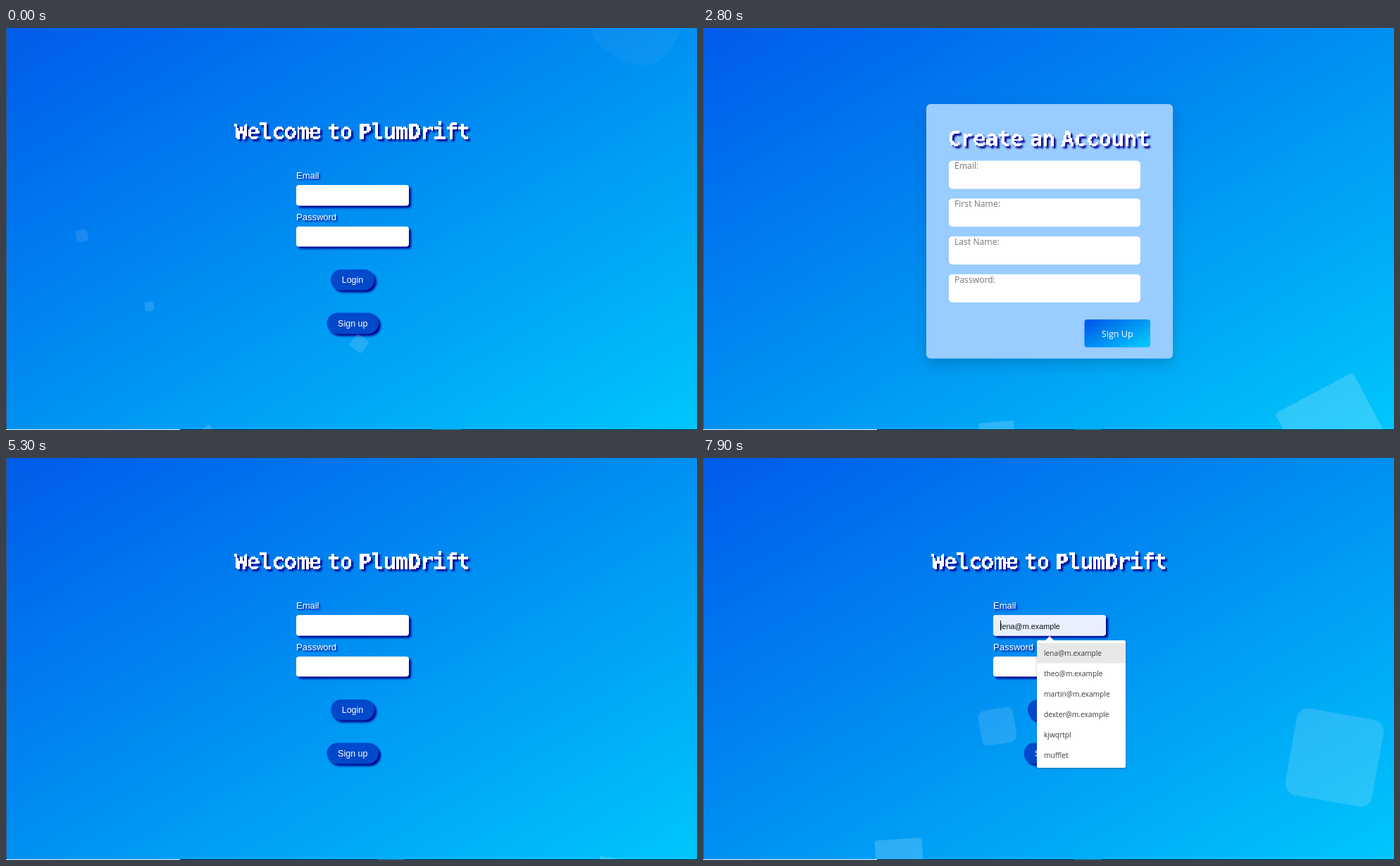
An HTML page for the animation above (8 s loop, 981 px wide and 571 px high).

```html
<!DOCTYPE html>
<html lang="en">
<head>
<meta charset="utf-8">
<title>Welcome</title>
<style>
  /* Seconds into the loop; everything that drifts derives from it. */
  @property --t { syntax: "<number>"; inherits: true; initial-value: 0; }

  html, body { margin: 0; width: 100%; height: 100%; overflow: hidden; }

  #stage {
    position: relative; width: 981px; height: 571px; overflow: hidden;
    background: linear-gradient(150deg, #005bea, #00c6fb);
    animation: clock 8s linear infinite;
  }
  @keyframes clock { from { --t: 0; } to { --t: 8; } }

  svg, .squares { position: absolute; inset: 0; width: 981px; height: 571px; }

  /* Scene cuts */
  .first, .signup, .second, .login, .hover, .menu, .pick {
    animation: 8s step-end infinite;
  }
  .first  { animation-name: first; }
  .signup { animation-name: signup; }
  .second { animation-name: second; }
  .login  { animation-name: login; }
  .hover  { animation-name: hover; }
  .menu   { animation-name: menu; }
  .pick   { animation-name: pick; }
  @keyframes first  { 0% { opacity: 1; } 24%, 100% { opacity: 0; } }
  @keyframes signup { 0% { opacity: 0; } 24% { opacity: 1; } 64.8%, 100% { opacity: 0; } }
  @keyframes second { 0% { opacity: 0; } 64.8%, 100% { opacity: 1; } }
  @keyframes login  { 0% { opacity: 1; } 24% { opacity: 0; } 64.8%, 100% { opacity: 1; } }
  @keyframes hover  { 0% { opacity: 0; } 17.4% { opacity: 1; } 24%, 100% { opacity: 0; } }
  @keyframes menu   { 0% { opacity: 0; } 84.9% { opacity: 1; } 100% { opacity: 1; } }
  @keyframes pick   { 0% { opacity: 0; } 93.6% { opacity: 1; } 100% { opacity: 1; } }

  /* Rising squares: --t0 start, --d seconds for the whole climb */
  .squares i {
    --q: calc((var(--t) - var(--t0)) / var(--d));
    position: absolute; bottom: -136.5px;
    left: calc(1px + var(--x) * 9.8px);
    width: var(--s); height: var(--s);
    background: rgba(255, 255, 255, .2);
    transform: translateY(calc(var(--q) * -833px)) rotate(calc(var(--q) * 720deg));
    opacity: calc(1 - var(--q));
    border-radius: calc(var(--q) * 50%);
  }
  .squares.signup { --t0: 1.915; }
  .squares.second { --t0: 5.185; }
  .a { --x: 25; --s: 66.7px;  --d: 22.7; }
  .b { --x: 10; --s: 16.7px;  --d: 11.25; }
  .c { --x: 40; --s: 50px;    --d: 7.5; }
  .e { --x: 65; --s: 16.7px;  --d: 22.7; }
  .f { --x: 50; --s: 20.8px;  --d: 20.8; }
  .g { --x: 20; --s: 12.5px;  --d: 15.05; }
  .h { --x: 85; --s: 125px;   --d: 10.28; }

  /* Type */
  text { white-space: pre; }
  .title {
    font: bold 31px "DejaVu Sans Mono", monospace;
    letter-spacing: -1.15px; word-spacing: -8.4px;
    fill: #fff; filter: url(#pixel);
  }
  .glow   { filter: drop-shadow(3px 3px 1px #0a0a96); }
  .label  { font: 13px "Liberation Sans", sans-serif; fill: #fff;
            filter: drop-shadow(2px 2px 1px #00008b); }
  .button { font: 12.5px "Liberation Sans", sans-serif; fill: #fff; text-anchor: middle; }
  .typed  { font: 10.9px "Liberation Sans", sans-serif; fill: #111; }
  .hint   { font: 12.2px "Open Sans", sans-serif; fill: #757575; }
  .send   { font: 12.6px "Open Sans", sans-serif; fill: #fff; text-anchor: middle; }
  .item   { font: 10.2px "Open Sans", sans-serif; fill: #3a3a3a; }
  .status { font: 9.3px "Open Sans", sans-serif; fill: #5f6368; }

  .drop { filter: drop-shadow(3px 3px 1.5px #00008b); }
  .card { filter: drop-shadow(0 8px 10px rgba(0, 0, 0, .16)); }
  .list { filter: drop-shadow(0 1px 1.5px rgba(0, 0, 0, .3)); }
</style>
</head>
<body>
<div id="stage">

  <svg viewBox="0 0 981 571">
    <defs>
      <!-- Samples every second pixel and spreads it over a 2 by 2 cell -->
      <filter id="pixel" filterUnits="userSpaceOnUse" x="0" y="0" width="981" height="571"
              color-interpolation-filters="sRGB">
        <feFlood x="0" y="0" width="1" height="1"/>
        <feComposite x="0" y="0" width="2" height="2"/>
        <feTile result="grid"/>
        <feComposite in="SourceGraphic" in2="grid" operator="in"/>
        <feComponentTransfer result="dot">
          <feFuncA type="discrete" tableValues="0 1"/>
        </feComponentTransfer>
        <feOffset in="dot" dx="1" result="right"/>
        <feMerge result="row"><feMergeNode in="dot"/><feMergeNode in="right"/></feMerge>
        <feOffset in="row" dy="1" result="below"/>
        <feMerge><feMergeNode in="row"/><feMergeNode in="below"/></feMerge>
      </filter>
      <linearGradient id="sky" gradientUnits="userSpaceOnUse" x1="571" y1="404" x2="605" y2="463">
        <stop stop-color="#005bea"/><stop offset="1" stop-color="#00c6fb"/>
      </linearGradient>
    </defs>

    <g class="login">
      <g class="glow"><text class="title" x="324" y="157">Welcome to PlumDrift</text></g>
      <text class="label" x="412" y="213.5">Email</text>
      <text class="label" x="412" y="272.5">Password</text>
      <g class="drop" fill="#fff">
        <rect x="412" y="223" width="160" height="29.5" rx="4"/>
        <rect x="412" y="282" width="160" height="28.5" rx="4"/>
      </g>
      <g class="drop" fill="#0049cb">
        <rect x="461" y="343" width="62" height="29.5" rx="14.7"/>
        <rect x="455.5" y="404.5" width="73.5" height="30" rx="15"/>
      </g>
      <rect class="hover" x="455.5" y="404.5" width="73.5" height="30" rx="15" fill="#549ff6"/>
      <text class="button" x="492" y="361.5">Login</text>
      <text class="button" x="492.3" y="424">Sign up</text>
      <g class="pick">
        <rect x="412" y="223" width="160" height="29.5" rx="4" fill="#e8f0fe"/>
        <text class="typed" x="422" y="242.5">lena@m.example</text>
      </g>
      <rect class="menu" x="422" y="231" width="1" height="14" fill="#111"/>
    </g>

    <g class="signup">
      <rect class="card" x="317" y="108" width="350" height="361.5" rx="6" fill="#99ccff"/>
      <g class="glow">
        <text class="title" x="347" y="167" style="letter-spacing:-.9px">Create an Account</text>
      </g>
      <g fill="#fff">
        <rect x="349" y="188.5" width="272" height="40" rx="5"/>
        <rect x="349" y="242.3" width="272" height="40" rx="5"/>
        <rect x="349" y="296" width="272" height="40" rx="5"/>
        <rect x="349" y="349.8" width="272" height="40" rx="5"/>
      </g>
      <text class="hint" x="357" y="199.5">Email:</text>
      <text class="hint" x="357" y="253.5">First Name:</text>
      <text class="hint" x="357" y="307.5">Last Name:</text>
      <text class="hint" x="357" y="361.5">Password:</text>
      <rect x="541.5" y="414" width="93.5" height="39.5" rx="4" fill="url(#sky)"/>
      <text class="send" x="588.3" y="439">Sign Up</text>
    </g>
  </svg>

  <div class="squares first">
    <i class="a" style="--t0:-1.77"></i>
    <i class="b" style="--t0:-5.46"></i>
    <i class="c" style="--t0:.01"></i>
    <i class="e" style="--t0:-1.77"></i>
    <i class="f" style="--t0:-6.22"></i>
    <i class="g" style="--t0:-5.52"></i>
    <i class="h" style="--t0:-8.14"></i>
  </div>
  <div class="squares signup"><i class="a"></i><i class="c"></i><i class="e"></i><i class="h"></i></div>
  <div class="squares second"><i class="a"></i><i class="c"></i><i class="e"></i><i class="h"></i></div>

  <svg viewBox="0 0 981 571">
    <g class="menu">
      <path class="list" fill="#fff"
            d="M476 259H486L492 253L498 259H598Q600 259 600 261V438Q600 440 598 440H476Q474 440 474 438V261Q474 259 476 259Z"/>
      <rect class="pick" x="474" y="263" width="126" height="28.5" fill="#e8e8e8"/>
      <text class="item" x="484" y="281">lena@m.example</text>
      <text class="item" x="484" y="310">theo@m.example</text>
      <text class="item" x="484" y="339">martin@m.example</text>
      <text class="item" x="484" y="368">dexter@m.example</text>
      <text class="item" x="484" y="397">kjwqrtpl</text>
      <text class="item" x="484" y="426">mufflet</text>
    </g>

    <!-- Window edges -->
    <rect width="1" height="571" fill="#34506e"/>
    <rect y="570" width="247" height="1" fill="#f4f8fb"/>
    <rect x="247" y="570" width="734" height="1" fill="#0b2233"/>
    <rect class="first" x="606" y="570" width="40" height="1" fill="#1f5f80"/>
    <rect class="signup" x="527" y="570" width="39" height="1" fill="#1f5f80"/>
    <rect class="second" x="527" y="570" width="39" height="1" fill="#1f5f80"/>

    <g class="hover">
      <path d="M0 561H101Q104 561 104 564V571H0Z" fill="#f1f3f4"/>
      <text class="status" x="3" y="572.5">localhost:3001/Signup</text>
    </g>
  </svg>
</div>
</body>
</html>
```
